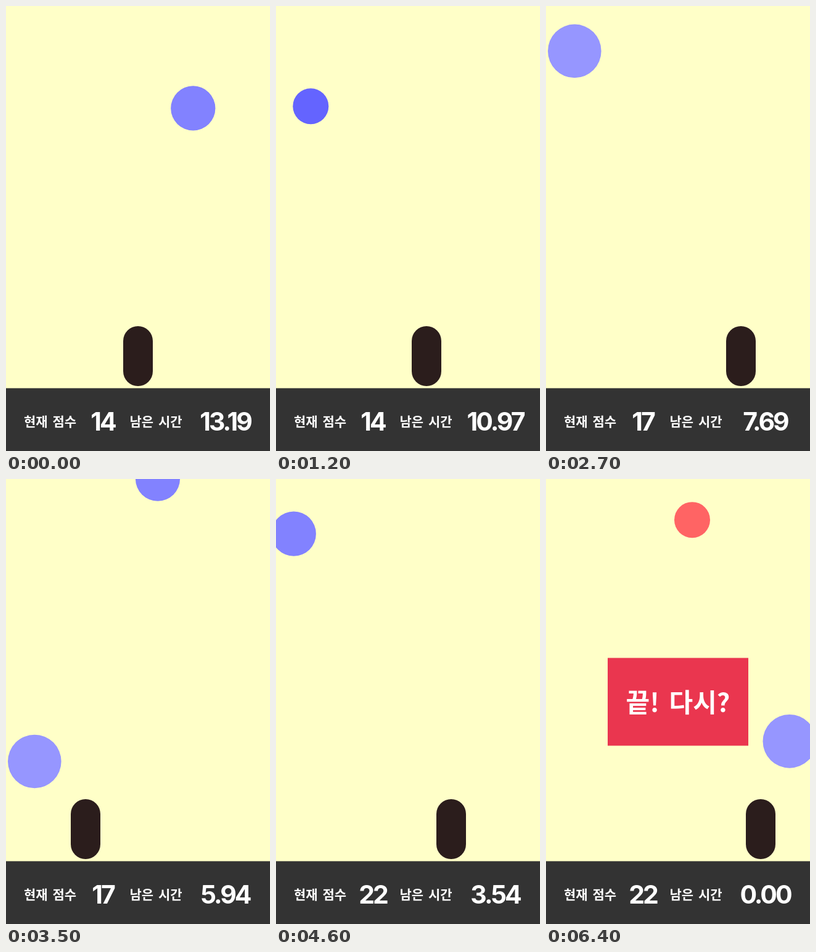
Write an HTML page with a canvas that moves like this. It is 428 by 720 pixels and loops after 6.5 s.

```html
<!DOCTYPE html>
<html lang="ko">
<head>
<meta charset="utf-8">
<style>
  html, body { margin: 0; width: 100%; height: 100%; overflow: hidden; background: #ffffc8; }
  canvas { display: block; }
</style>
</head>
<body>
<canvas id="stage" width="428" height="720"></canvas>
<script>
const ctx = document.getElementById('stage').getContext('2d');
const LOOP = 6500, STEP = 100;
const GROUND = 618.4, CATCH_LINE = 530, HALF_GRAVITY = 90.5, RUN_SPEED = 131.8;
const CLOCK_START = 13.156, CLOCK_RATE = 0.002186;
const HANGUL = '"Noto Sans CJK KR", "Noto Sans CJK", "Noto Sans CJK JP", sans-serif';
const DIGITS = 'Inter, sans-serif';

const small = { r: 29, color: '#6464ff', points: 1 };
const medium = { r: 36.1, color: '#8282ff', points: 2 };
const big = { r: 43.3, color: '#9696ff', points: 3 };
const red = { r: 29, color: '#ff6464', points: -5 };

// One ball drops every two seconds of game time: kind, x, start y, caught
const balls = [
  [medium, 303.3, 101.6], [small, 56.3, 60.5, true], [medium, 366, 42, true],
  [big, 46.3, 62.5, true], [medium, 246, -1, true], [medium, 28.8, 66.7],
  [big, 394.8, 47], [red, 237, 66]
].map(([kind, x, y, caught], i) => {
  const limit = caught ? CATCH_LINE : GROUND;
  const life = Math.sqrt((limit - kind.r - y) / HALF_GRAVITY);
  return { ...kind, x, y, caught, life, born: 14.03 - 2 * i };
});

// Places where the runner turns around
const turns = [210, 280, 151, 260, 80, 338, 82, 318, 82, 400];

function runner(distance) {
  let i = 0, leg;
  while (distance > (leg = Math.abs(turns[i + 1] - turns[i]))) {
    distance -= leg;
    i++;
  }
  const dir = Math.sign(turns[i + 1] - turns[i]);
  return { x: turns[i] + dir * distance, dir };
}

function rect(x, y, w, h, color) {
  ctx.fillStyle = color;
  ctx.fillRect(x, y, w, h);
}

function text(str, x, y, size, family, spacing = 0) {
  ctx.font = `700 ${size}px ${family}`;
  ctx.letterSpacing = spacing + 'px';
  ctx.wordSpacing = size * 0.15 + 'px';
  ctx.textAlign = 'center';
  ctx.fillStyle = '#fff';
  ctx.fillText(str, x, y);
}

function drawBall({ x, y, r, color, born, life }, clock) {
  const age = born - clock;
  if (age < 0 || age > life) return;
  ctx.fillStyle = color;
  ctx.beginPath();
  ctx.arc(x, y + HALF_GRAVITY * age * age, r, 0, 2 * Math.PI);
  ctx.fill();
}

function drawRunner({ x, dir }) {
  ctx.fillStyle = '#2b1d1c';
  ctx.beginPath();
  ctx.roundRect(Math.round(x + 4 * dir) - 24, 518, 48, 97, 24);
  ctx.fill();
}

function draw(time) {
  const t = Math.floor(time % LOOP / STEP) * STEP;
  const clock = t < 200 ? 13.19
    : Math.max(-0.012, CLOCK_START - (t - 200) * CLOCK_RATE);
  const score = balls
    .filter(b => b.caught && b.born - clock > b.life)
    .reduce((sum, b) => sum + b.points, 14);

  rect(0, 0, 428, 720, '#ffffc8');
  drawRunner(runner(Math.max(0, CLOCK_START - clock) * RUN_SPEED));
  balls.forEach(b => drawBall(b, clock));

  rect(0, GROUND, 428, 102, '#333');
  text('현재 점수', 71.5, 680, 21, HANGUL);
  text('남은 시간', 243, 680, 21, HANGUL);
  text(score, 157, 687, 41, DIGITS, -3);
  text(Math.max(0, clock).toFixed(2), 355.5, 687, 41, DIGITS, -3);

  if (clock <= 0) {
    rect(100, 289.5, 228, 142, '#ea364f');
    text('끝! 다시?', 214, 377, 42, HANGUL);
  }
}

const start = performance.now();
function tick() {
  draw(performance.now() - start);
  requestAnimationFrame(tick);
}
tick();
</script>
</body>
</html>
```
